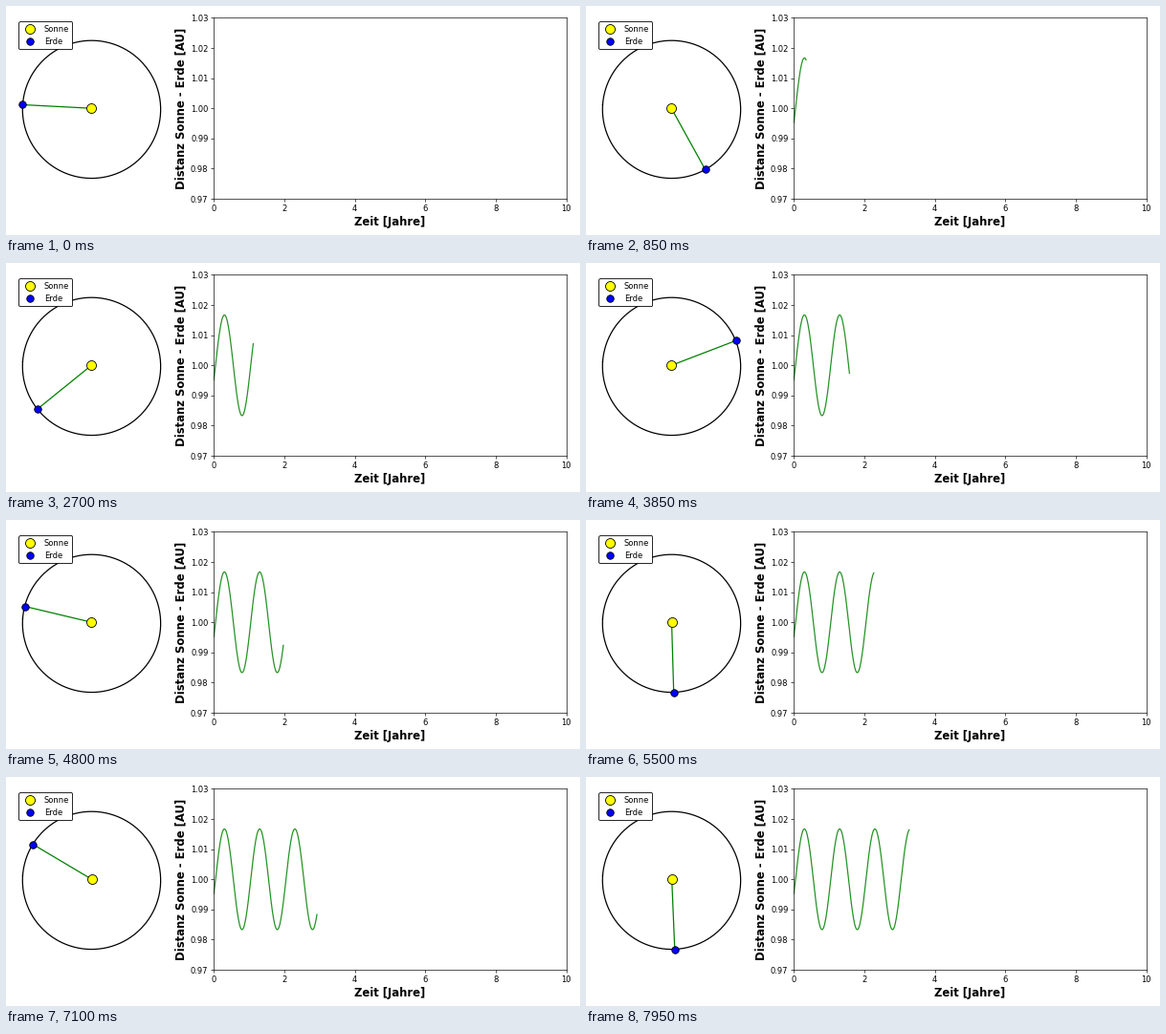
Animation, 600 px wide and 240 px high, one loop 8 s. Source, as a matplotlib script:

```python
import numpy as np
import matplotlib.pyplot as plt
from matplotlib.animation import FuncAnimation

DPI = 60
W, H = 600, 240
FRAMES, INTERVAL = 160, 50
STEP = 6 / 365.25            # years per simulation step
STEPS_PER_FRAME = 1.25

ECC = 0.0167
PERIHELION = np.radians(102.9)
M0 = np.radians(72.3)        # mean anomaly at the start
AU = 72.2                    # pixels
SUN = np.array([89.2, 107.2])
DRIFT = np.array([0.15, 0.0])  # pixels per year


def orbit(t):
    """Distance [AU] and longitude of the earth at time t [years]."""
    m = M0 + 2 * np.pi * t
    e = m
    for _ in range(5):
        e = m + ECC * np.sin(e)
    nu = 2 * np.arctan2(np.sqrt(1 + ECC) * np.sin(e / 2),
                        np.sqrt(1 - ECC) * np.cos(e / 2))
    return 1 - ECC * np.cos(e), nu + PERIHELION


def place(r, angle):
    return AU * r * np.cos(angle), -AU * r * np.sin(angle)


fig = plt.figure(figsize=(W / DPI, H / DPI), dpi=DPI)

# orbit view, in pixel coordinates
sky = fig.add_axes([0, 0, 1, 1])
sky.set(xlim=(0, W), ylim=(H, 0))
sky.axis("off")
ox, oy = place(*orbit(np.linspace(0, 1, 400)))
sky.plot(SUN[0] + ox, SUN[1] + oy, color="black", lw=1.5)
link, = sky.plot([], [], color="green", lw=1.5)
sun, = sky.plot([], [], "o", ms=12, mfc="yellow", mec="black", label="Sonne")
earth, = sky.plot([], [], "o", ms=9, mfc="blue", mec="black", label="Erde")
sky.legend(loc="upper left", bbox_to_anchor=(13, 16.4),
           bbox_transform=sky.transData, borderaxespad=0,
           framealpha=1, edgecolor="black", fontsize=10)

# distance over time
left, right, top, bottom = 217.3, 585.6, 12.4, 202
ax = fig.add_axes([left / W, 1 - bottom / H, (right - left) / W, (bottom - top) / H])
ax.set(xlim=(0, 10), ylim=(0.97, 1.03))
ax.set_xlabel("Zeit [Jahre]", fontsize=14, fontweight="bold")
ax.set_ylabel("Distanz Sonne - Erde [AU]", fontsize=14, fontweight="bold")
curve, = ax.plot([], [], color="green", lw=1.5, alpha=0.85)


def update(i):
    k = int(STEPS_PER_FRAME * i + 0.5)
    t = np.arange(k + 1) * STEP
    r, angle = orbit(t)
    sx, sy = SUN + DRIFT * t[-1]
    dx, dy = place(r[-1], angle[-1])
    sun.set_data([sx], [sy])
    earth.set_data([sx + dx], [sy + dy])
    link.set_data([sx, sx + dx], [sy, sy + dy])
    if k:
        curve.set_data(t, r)
    else:
        curve.set_data([], [])
    return link, sun, earth, curve


anim = FuncAnimation(fig, update, frames=FRAMES, interval=INTERVAL,
                     repeat=True, repeat_delay=0)
plt.show()
```
